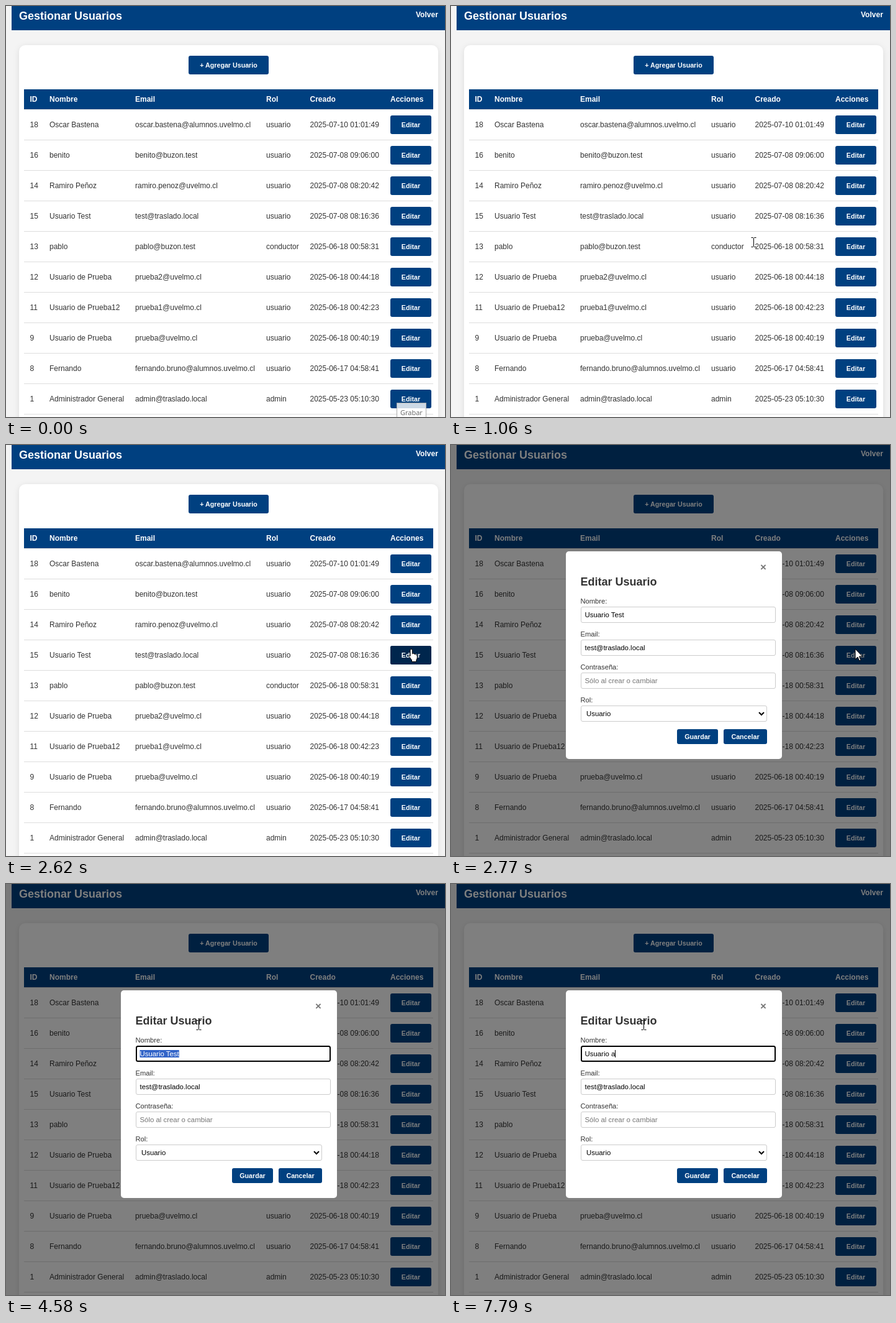
Recreate the animation shown at these times as an HTML page. Size 707x661 px, loop 8 s.

```html
<!DOCTYPE html>
<html lang="es">
<head>
<meta charset="utf-8">
<title>Gestionar Usuarios</title>
<style>
html, body { margin: 0; width: 100%; height: 100%; overflow: hidden; background: #f4f4f4; }
svg { display: block; font: 12px "Liberation Sans", Arial, sans-serif; }
text { fill: #333; white-space: pre; }
.title { font-size: 18px; font-weight: bold; }
.light { fill: #fff; font-weight: bold; }
.button { fill: #fff; font-weight: bold; font-size: 10.7px; text-anchor: middle; }
.label { font-size: 11.2px; }
.value { font-size: 11.4px; fill: #000; }
.hint { font-size: 11.4px; fill: #757575; }
.close { font-size: 17px; font-weight: bold; fill: #777; text-anchor: middle; }
.tip { font: 11px "Open Sans", sans-serif; fill: #666; }
.card { filter: drop-shadow(0 2px 5px rgba(0, 0, 0, .1)); }
</style>
</head>
<body>
<svg id="stage" width="707" height="661" viewBox="0 0 707 661"></svg>
<script>
const LOOP = 8000, OPEN = 2770, PRESS = 3590, DRAG_END = 3830, RELEASE = 4140, TYPE = 5270;
const BLUE = '#004080', DARK = '#00264d';
const NAME = 'Usuario Test', NEW_NAME = 'Usuario a', NAME_X = 215.5;
const ROW_TOP = 167, ROW = 49;

const users = [
  [18, 'Oscar Bastena', 'oscar.bastena@alumnos.uvelmo.cl', 'usuario', '2025-07-10 01:01:49'],
  [16, 'benito', 'benito@buzon.test', 'usuario', '2025-07-08 09:06:00'],
  [14, 'Ramiro Peñoz', 'ramiro.penoz@uvelmo.cl', 'usuario', '2025-07-08 08:20:42'],
  [15, NAME, 'test@traslado.local', 'usuario', '2025-07-08 08:16:36'],
  [13, 'pablo', 'pablo@buzon.test', 'conductor', '2025-06-18 00:58:31'],
  [12, 'Usuario de Prueba', 'prueba2@uvelmo.cl', 'usuario', '2025-06-18 00:44:18'],
  [11, 'Usuario de Prueba12', 'prueba1@uvelmo.cl', 'usuario', '2025-06-18 00:42:23'],
  [9, 'Usuario de Prueba', 'prueba@uvelmo.cl', 'usuario', '2025-06-18 00:40:19'],
  [8, 'Fernando', 'fernando.bruno@alumnos.uvelmo.cl', 'usuario', '2025-06-17 04:58:41'],
  [1, 'Administrador General', 'admin@traslado.local', 'admin', '2025-05-23 05:10:30']
];
const columns = [38.5, 70, 208, 419, 489.5, 619];

const text = (x, y, s, cls = '') => `<text x="${x}" y="${y}" class="${cls}">${s}</text>`;
const rect = (x, y, w, h, fill, r = 0, more = '') =>
  `<rect x="${x}" y="${y}" width="${w}" height="${h}" rx="${r}" fill="${fill}" ${more}/>`;
const button = (x, y, w, h, s, fill = BLUE) =>
  rect(x, y, w, h, fill, 3) + text(x + w / 2, y + h / 2 + 4, s, 'button');
const field = (y, w = 314) => rect(209.5, y + .5, w - 1, 25, '#fff', 2.5, 'stroke="#ccc"');
const editButton = (row, fill) => button(619, ROW_TOP + 9 + ROW * row, 66, 30, 'Editar', fill);
const rule = y => rect(29, y, 659, 1, '#ddd');

const pageMarkup =
  rect(0, 0, 707, 661, '#f4f4f4') +
  rect(9, 0, 698, 39, BLUE) +
  text(21, 22, 'Gestionar Usuarios', 'title light') +
  text(660, 18, 'Volver', 'light') +
  rect(21, 63, 675, 700, '#fff', 10, 'class="card"') +
  button(294, 80, 129, 30, '+ Agregar Usuario') +
  rect(29, 134, 659, 32, BLUE) + rule(166) +
  ['ID', 'Nombre', 'Email', 'Rol', 'Creado', 'Acciones']
    .map((s, i) => text(columns[i], 154, s, 'light')).join('') +
  users.map((user, row) =>
    user.map((s, i) => text(columns[i], ROW_TOP + 28 + ROW * row, s)).join('') +
    rule(ROW_TOP + 48 + ROW * row) + editButton(row)).join('');

const modalMarkup =
  rect(0, 0, 707, 661, 'rgba(0,0,0,.5)') +
  rect(185, 171, 348, 334, '#fff', 5) +
  text(503, 201.5, '×', 'close') +
  text(208.5, 226, 'Editar Usuario', 'title') +
  ['Nombre:', 'Email:', 'Contraseña:', 'Rol:']
    .map((s, i) => text(208.5, 255 + 53 * i, s, 'label')).join('') +
  field(260) + field(313) + field(366) + field(419, 300) +
  text(NAME_X, 330, users[3][2], 'value') +
  text(NAME_X, 383, 'Sólo al crear o cambiar', 'hint') +
  text(218, 436, 'Usuario', 'value') +
  '<path d="M496 430l4 4 4-4" fill="none" stroke="#000" stroke-width="2"/>' +
  button(364, 457, 66, 24, 'Guardar') + button(439, 457, 70, 24, 'Cancelar');

const tooltip = rect(629.5, 638.5, 47, 30, 'rgba(255,255,255,.8)', 0, 'stroke="#aaa"') +
  text(635, 658, 'Grabar', 'tip');

const stage = document.getElementById('stage');
stage.innerHTML = pageMarkup + `<g id="modal">${modalMarkup}</g><g id="live"></g>`;
const modal = document.getElementById('modal'), live = document.getElementById('live');

const pen = document.createElement('canvas').getContext('2d');
pen.font = '11.4px "Liberation Sans", Arial, sans-serif';
const nameX = s => NAME_X + pen.measureText(s).width;

const progress = (t, from, to) => Math.min(1, Math.max(0, (t - from) / (to - from)));
const smooth = u => u * u * (3 - 2 * u);
const mix = (a, b, u) => a.map((v, i) => Math.round(v + (b[i] - v) * u));

// The pointer circles counterclockwise over the table
function circle(t) {
  const angle = (44 - .54 * (t - 1060)) * Math.PI / 180;
  return [306 + 249 * Math.cos(angle), 285 + 138 * Math.sin(angle)];
}

function pointerAt(t) {
  const entry = [655, 650], edit = [651, 328], nameEnd = [284, 272], nameStart = [193, 272];
  if (t < 1660) return mix(entry, circle(Math.max(t, 510)), smooth(progress(t, 30, 510)));
  if (t < OPEN) return mix(circle(1660), edit, smooth(progress(t, 1660, 2450)));
  if (t < PRESS) return mix(edit, nameEnd, smooth(progress(t, OPEN, 3530)));
  if (t < RELEASE) return mix(nameEnd, nameStart, progress(t, PRESS, DRAG_END));
  return mix(nameStart, [310, 227], smooth(progress(t, RELEASE, 4320)));
}

const pointers = {
  arrow: '<path d="M0 0V16.5L4 13l2.6 6 2.4-1-2.6-6H11.5Z" fill="#fff" stroke="#000"/>',
  hand: '<path d="M0 2a1.7 1.7 0 0 1 3.4 0V8l1-.8 1.6.3.6.8h1.6l.8 1 1.6.3.6 1.2V15l-1.4 3v2.5H2.5V18l-4-5.5c-1.2-2 .6-2.8 1.6-1.8L0 11.5Z" fill="#fff" stroke="#000"/>',
  beam: '<path d="M-3.5-7.5h3l1 1 1-1h3M-3.5 7.5h3l1-1 1 1h3M.5-6.5v13" fill="none" stroke="#000"/>'
};

function pointer(t) {
  const [x, y] = pointerAt(t);
  let kind = 'arrow', out = '';
  if (t >= OPEN) {
    if (x < 523 && y < 287) kind = 'beam';
  } else if (y >= ROW_TOP && x > 29 && x < 688) {
    const row = Math.floor((y - ROW_TOP) / ROW), dy = (y - ROW_TOP) % ROW;
    const hover = x >= 619 && x < 685 && dy >= 9 && dy < 39;
    kind = hover ? 'hand' : 'beam';
    if (hover) out += editButton(row, DARK);
  }
  if ((t >= 2550 && t < 2620) || (t >= PRESS && t < RELEASE))
    out += `<circle cx="${x}" cy="${y}" r="11.5" fill="#f5e000" opacity=".65"/>`;
  return out + `<g transform="translate(${x} ${y})">${pointers[kind]}</g>`;
}

// Three slow keystrokes, a quick run, then a late last letter
function typedCount(t) {
  if (t >= 7790) return 9;
  return t < 5830 ? 1 + Math.floor((t - TYPE) / 280) : Math.min(8, 3 + Math.floor((t - 5830) / 92));
}

function nameField(t) {
  let out = t < PRESS ? '' :
    rect(210, 261, 312, 24, '#fff', 2.5, 'stroke="#000" stroke-width="2"');
  if (t < TYPE) {
    const start = Math.ceil(NAME.length * (1 - progress(t, PRESS, DRAG_END + 20)));
    const head = NAME.slice(0, start), x = nameX(head);
    return out + rect(x, 267, nameX(NAME) - x, 12, '#3264c8') +
      text(NAME_X, 277, `${head}<tspan fill="#fff">${NAME.slice(start)}</tspan>`, 'value');
  }
  const value = NEW_NAME.slice(0, typedCount(t));
  const caret = t < 7330 || t >= 7790;
  return out + text(NAME_X, 277, value, 'value') +
    (caret ? rect(Math.round(nameX(value)), 267, 1, 12, '#000') : '');
}

function frame() {
  const t = performance.now() % LOOP;
  modal.style.display = t < OPEN ? 'none' : '';
  live.innerHTML = (t < OPEN ? '' : nameField(t)) + (t < 30 ? tooltip : pointer(t));
  requestAnimationFrame(frame);
}
frame();
</script>
</body>
</html>
```
